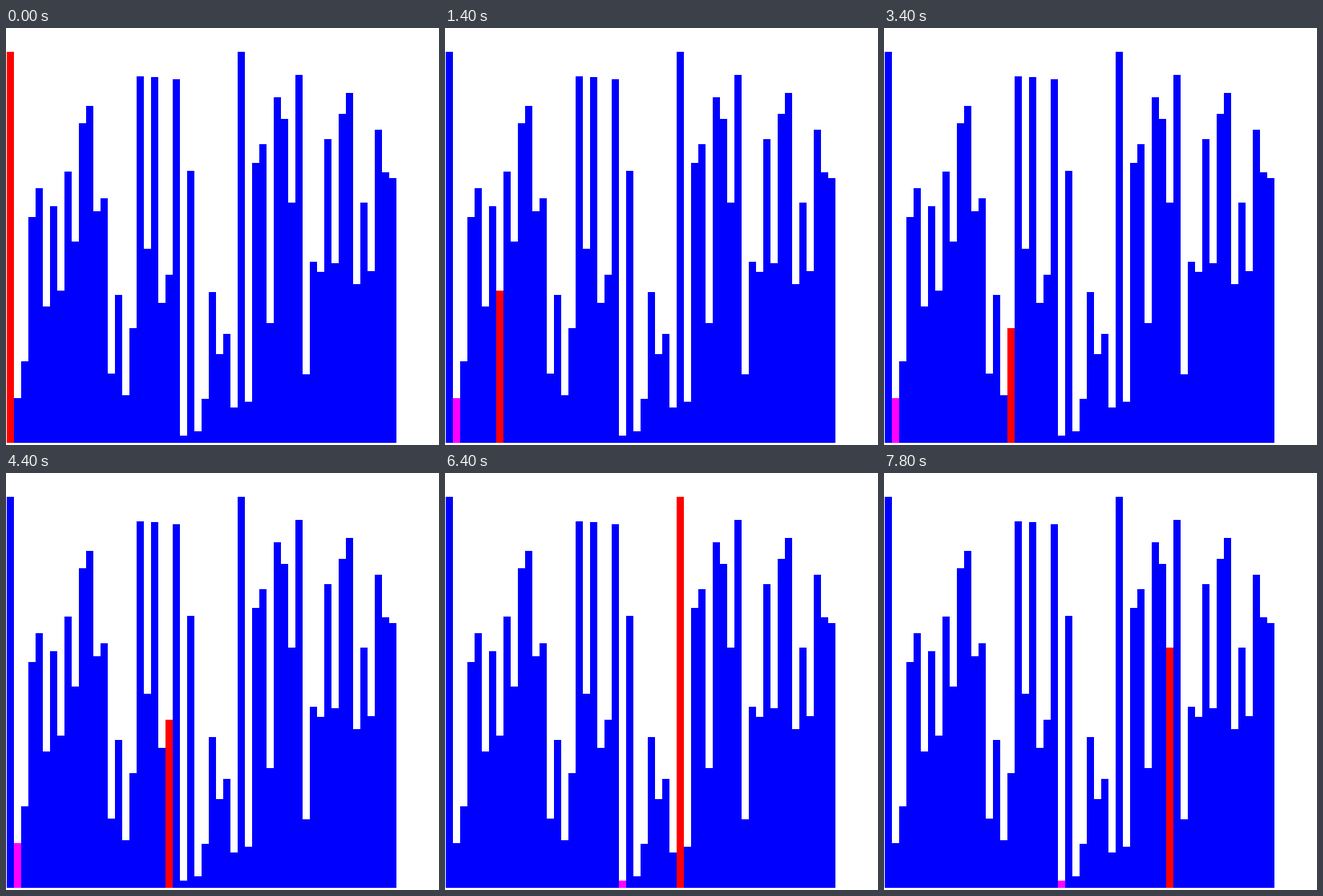
An HTML page with a canvas for the animation above (8000 ms loop, 600 by 578 pixels).

```html
<!DOCTYPE html>
<html lang="en">
<head>
<meta charset="utf-8">
<title>Selection sort scan</title>
<style>
  html, body { margin: 0; width: 100%; height: 100%; overflow: hidden; background: #fff; }
  canvas { display: block; }
</style>
</head>
<body>
<canvas id="stage" width="600" height="578"></canvas>
<script>
const STEP = 200, STEPS = 40;
const BAR = 10, LEFT = 1, FLOOR = 575;
const tops = [
  33, 513, 462, 262, 222, 386, 247, 364, 199, 296, 132, 108, 254, 236,
  479, 370, 509, 416, 67, 306, 68, 381, 342, 71, 565, 198, 559, 514,
  366, 452, 424, 526, 33, 518, 187, 161, 409, 96, 126, 242, 65, 480,
  324, 338, 154, 326, 119, 90, 355, 242, 337, 141, 200, 208
];
const ctx = document.getElementById('stage').getContext('2d');

// The smallest bar met so far; the starting bar is not marked.
function smallestUpTo(scan) {
  let best = 0;
  for (let i = 1; i <= scan; i++) if (tops[i] > tops[best]) best = i;
  return best || -1;
}

function draw(scan) {
  const smallest = smallestUpTo(scan);
  ctx.fillStyle = '#fff';
  ctx.fillRect(0, 0, 600, 578);
  tops.forEach((top, i) => {
    ctx.fillStyle = i === smallest ? '#f0f' : i === scan ? '#f00' : '#00f';
    ctx.fillRect(LEFT + i * BAR, top, BAR, FLOOR - top);
  });
}

function frame() {
  draw(Math.floor(performance.now() / STEP) % STEPS);
  requestAnimationFrame(frame);
}
frame();
</script>
</body>
</html>
```
